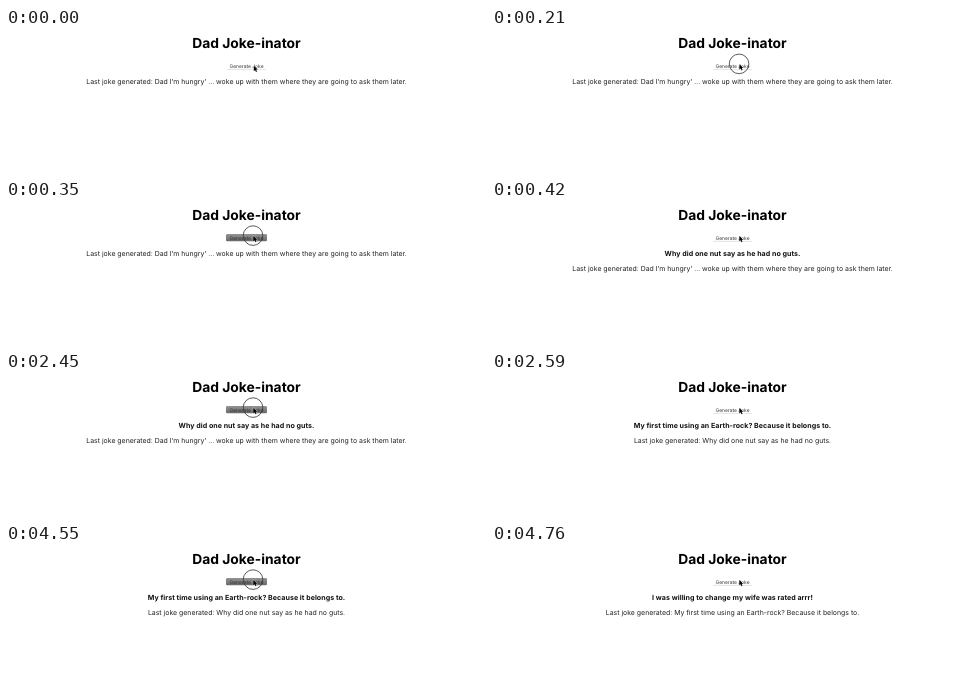
An HTML page for the animation above (5.53 s loop, 480 px wide and 144 px high).

```html
<!DOCTYPE html>
<html lang="en">
<head>
<meta charset="utf-8">
<title>Dad Joke-inator</title>
<style>
  html, body { margin: 0; width: 100%; height: 100%; overflow: hidden; background: #fff; }
  svg { display: block; width: 100%; height: 100%; }
  text { font-family: Inter, "Liberation Sans", sans-serif; text-anchor: middle; text-rendering: geometricPrecision; }
  .title { font-size: 13.83px; font-weight: 700; fill: #000; }
  .joke { font-size: 7.05px; font-weight: 700; letter-spacing: .05px; fill: #111; }
  .last { font-size: 6.93px; fill: #222; }
  .label { font-size: 4.95px; fill: #333; }
</style>
</head>
<body>
<svg viewBox="0 0 480 144">
  <defs>
    <linearGradient id="pressed" x2="0" y2="1">
      <stop offset="0" stop-color="#939393"/>
      <stop offset="1" stop-color="#686868"/>
    </linearGradient>
  </defs>
  <rect width="480" height="144" fill="#fff"/>
  <text class="title" x="240.5" y="19.8">Dad Joke-inator</text>
  <g id="button">
    <rect id="face" x="220" y="34.1" width="41" height="7.2" rx="1.3"/>
    <path id="edge" d="M221 41.4H260" stroke="#d2d2d2" stroke-width=".6"/>
    <text class="label" x="240.5" y="39.6">Generate Joke</text>
  </g>
  <text class="joke" id="joke" x="240.5" y="55.6"></text>
  <text class="last" id="last" x="240.5"></text>
  <g id="pointer">
    <circle id="ring" r="9.8" fill="none" stroke="#333" stroke-width=".8"/>
    <path d="M.3 .3V5.8L1.6 4.6L2.5 6.7L3.5 6.2L2.6 4.2H4.3Z" fill="#000" stroke="#fff" stroke-width=".6" paint-order="stroke"/>
  </g>
</svg>
<script>
const LOOP = 5530;
const STEP = 70;
const jokes = [
  "Dad I’m hungry’ … woke up with them where they are going to ask them later.",
  "Why did one nut say as he had no guts.",
  "My first time using an Earth-rock? Because it belongs to.",
  "I was willing to change my wife was rated arrr!"
];
// ring: click ring appears; press: button darkens; release: next joke is shown
const clicks = [
  { ring: 210, press: 280, release: 420 },
  { ring: 2380, press: 2450, release: 2590 },
  { ring: 4550, press: 4550, release: 4760 }
];
const el = id => document.getElementById(id);
const show = (node, visible) => node.setAttribute("visibility", visible ? "visible" : "hidden");

function render(time) {
  const t = Math.floor(time / STEP) * STEP;
  const count = clicks.filter(c => t >= c.release).length;
  const click = clicks.find(c => t >= c.ring && t < c.release);
  const pressed = Boolean(click) && t >= click.press;

  el("joke").textContent = count ? jokes[count] : "";
  el("last").textContent = "Last joke generated: " + jokes[Math.max(0, count - 1)];
  el("last").setAttribute("y", count ? 71.1 : 55.6);

  el("face").setAttribute("fill", pressed ? "url(#pressed)" : "#fff");
  show(el("edge"), !pressed);
  show(el("ring"), Boolean(click));

  const rest = Math.max(0, 1 - t / 350) ** 2;
  el("pointer").setAttribute("transform", `translate(${247 + .5 * rest} ${35.6 + 1.8 * rest})`);
}

function tick() {
  render(performance.now() % LOOP);
  requestAnimationFrame(tick);
}
tick();
</script>
</body>
</html>
```
